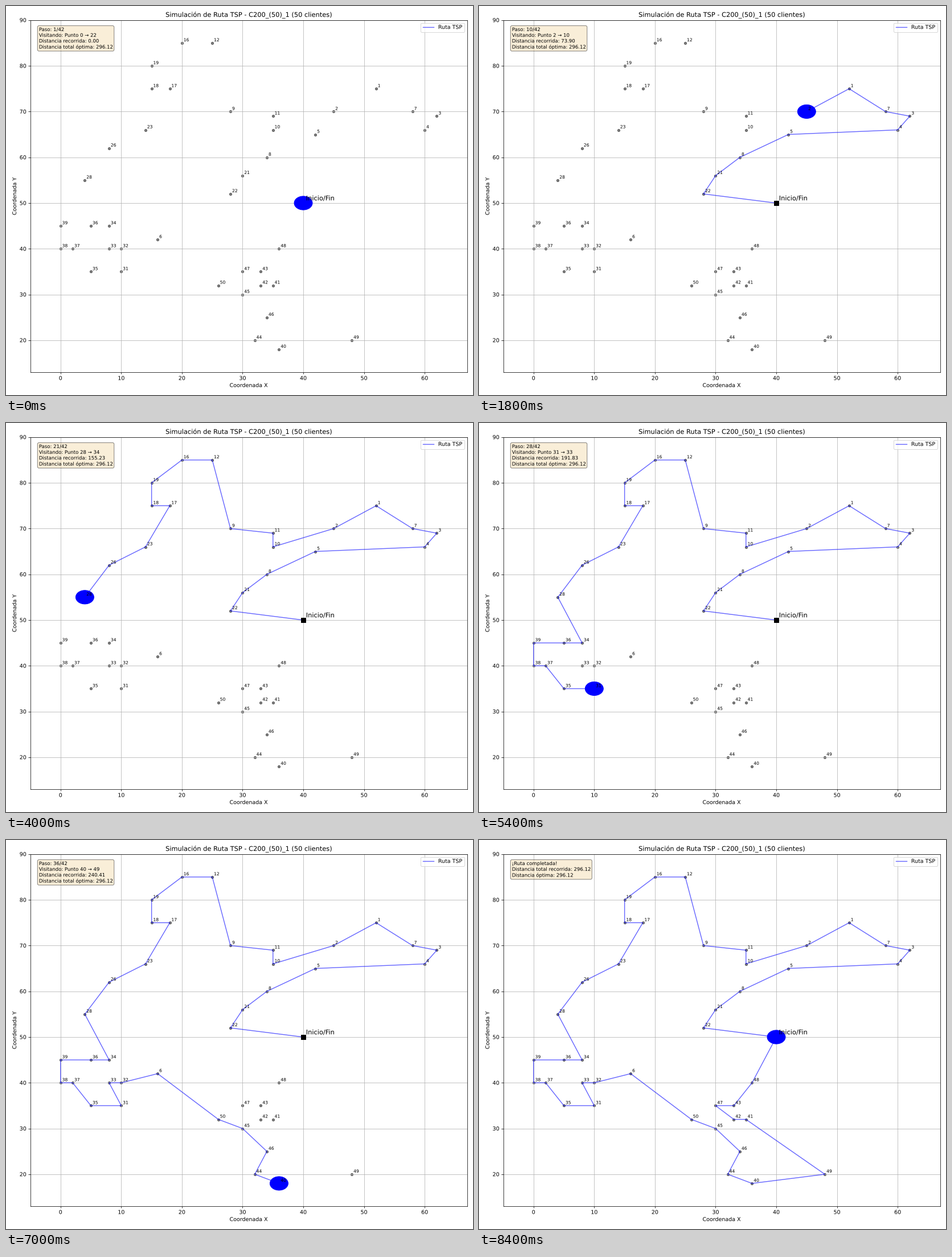
A matplotlib script for the animation above (8600 ms loop, 820 by 683 pixels).

```python
from math import dist

import numpy as np
import matplotlib.pyplot as plt
from matplotlib.animation import FuncAnimation
from matplotlib.patches import Circle
from matplotlib.patheffects import Normal

W, H, DPI = 820, 683, 64
K = W / 12 / DPI  # point sizes are those of a 12-inch wide figure

rc = plt.rcParams
rc["font.family"] = "DejaVu Sans"
rc["text.hinting"] = "none"
rc["path.effects"] = [Normal()]  # vector text, placed to sub-pixel accuracy
scaled = ["font.size", "axes.linewidth", "axes.titlepad", "axes.labelpad",
          "grid.linewidth", "lines.linewidth", "lines.markeredgewidth",
          "patch.linewidth"]
scaled += [f"{a}tick.major.{part}" for a in "xy" for part in ("size", "width", "pad")]
for key in scaled:
    rc[key] *= K

# The depot (id 0) and the clients, in order of id
IDS = [*range(13), *range(16, 20), *range(21, 24), 26, 28, *range(31, 51)]
PLACES = [
    (40, 50), (52, 75), (45, 70), (62, 69), (60, 66), (42, 65), (16, 42),
    (58, 70), (34, 60), (28, 70), (35, 66), (35, 69), (25, 85), (20, 85),
    (18, 75), (15, 75), (15, 80), (30, 56), (28, 52), (14, 66), (8, 62),
    (4, 55), (10, 35), (10, 40), (8, 40), (8, 45), (5, 35), (5, 45),
    (2, 40), (0, 40), (0, 45), (36, 18), (35, 32), (33, 32), (33, 35),
    (32, 20), (30, 30), (34, 25), (30, 35), (36, 40), (48, 20), (26, 32),
]
POINTS = dict(zip(IDS, PLACES))
# Where the best tour does not go on to the nearest client
DETOURS = {0: 22, 8: 5, 5: 4, 2: 10, 9: 12, 28: 34, 31: 33, 45: 46, 42: 47}


def find_tour():
    tour, left = [0], set(IDS[1:])
    while left:
        here = tour[-1]
        nearest = min(left, key=lambda p: dist(POINTS[here], POINTS[p]))
        tour.append(DETOURS.get(here, nearest))
        left.remove(tour[-1])
    return tour + [0]


tour = find_tour()
path = np.array([POINTS[p] for p in tour])
steps = len(tour) - 1
travelled = np.r_[0, np.cumsum(np.hypot(*np.diff(path, axis=0).T))]
total = travelled[-1]

fig, ax = plt.subplots(figsize=(W / DPI, H / DPI), dpi=DPI)
fig.subplots_adjust(left=42.5 / W, right=809.75 / W, bottom=39.9 / H, top=658.2 / H)
ax.set(xlim=(-5, 67), ylim=(13, 90), xlabel="Coordenada X", ylabel="Coordenada Y")
ax.set_title("Simulación de Ruta TSP - C200_(50)_1 (50 clientes)")
ax.grid(True)

ax.scatter(*path[1:-1].T, c="black", s=20 * K**2, alpha=0.5)
line, = ax.plot([], [], "b-", alpha=0.6, label="Ruta TSP")
ax.plot(*path[0], "ks", markersize=8 * K, zorder=2.5)
vehicle = ax.add_patch(Circle(path[0], 1.5, color="blue", zorder=2.8))


def tag(text, xy, gap, size):
    ax.annotate(text, xy, xytext=(gap * K, gap * K), textcoords="offset points",
                fontsize=size * K)


tag("Inicio/Fin", path[0], 5, 12)
for p, xy in zip(IDS[1:], PLACES[1:]):
    tag(str(p), xy, 3, 8)

info = ax.text(0.02, 0.98, "", transform=ax.transAxes, fontsize=9 * K, va="top",
               bbox=dict(boxstyle="round", facecolor="wheat", alpha=0.5))
ax.legend(loc="upper right")


def update(i):
    line.set_data(*path[:i + 1].T)
    vehicle.center = tuple(path[i])
    if i < steps:
        info.set_text(f"Paso: {i + 1}/{steps}\n"
                      f"Visitando: Punto {tour[i]} → {tour[i + 1]}\n"
                      f"Distancia recorrida: {travelled[i]:.2f}\n"
                      f"Distancia total óptima: {total:.2f}")
    else:
        info.set_text("¡Ruta completada!\n"
                      f"Distancia total recorrida: {total:.2f}\n"
                      f"Distancia óptima: {total:.2f}")
    return line, vehicle, info


anim = FuncAnimation(fig, update, frames=steps + 1, interval=200,
                     repeat=True, repeat_delay=0, blit=False)
plt.show()
```
